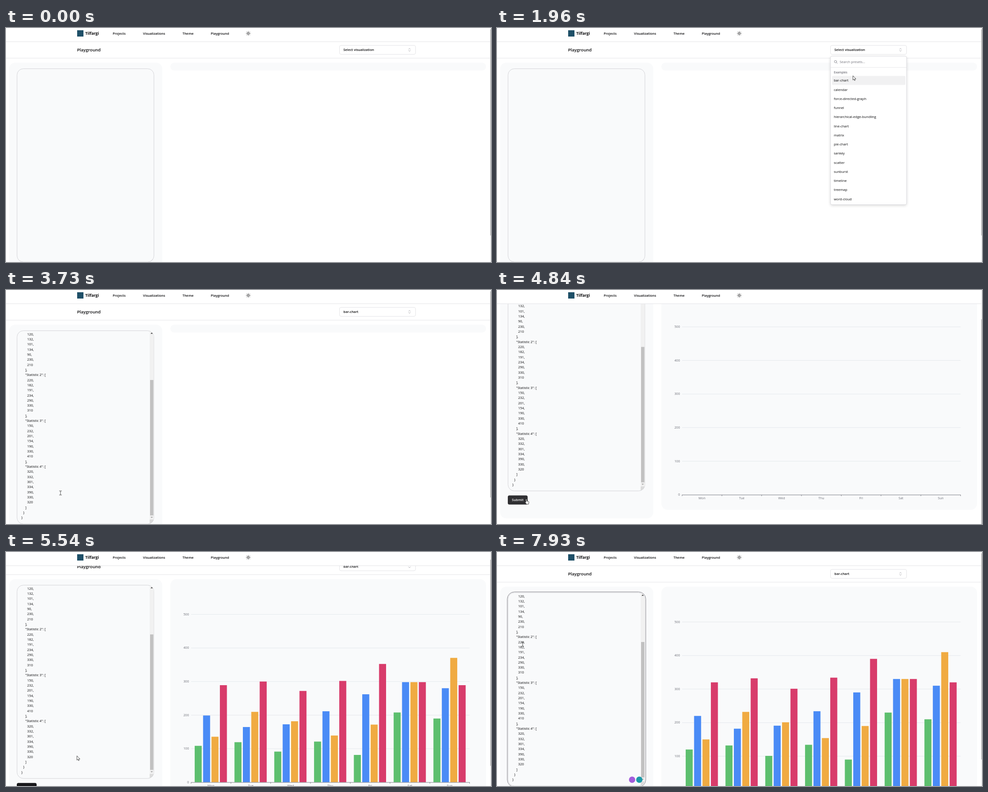
Recreate the animation shown at these times as an HTML page with a canvas. Size 1077 by 520 pixels, loop 8000 ms.

```html
<!DOCTYPE html>
<html lang="en">
<head>
<meta charset="utf-8">
<title>Chart playground</title>
<style>
  html, body { margin: 0; width: 100%; height: 100%; overflow: hidden; background: #fff; }
  canvas { display: block; }
</style>
</head>
<body>
<canvas id="stage" width="1077" height="520"></canvas>
<script>
const ctx = document.getElementById('stage').getContext('2d');
const LOOP = 8000, W = 1077, H = 520;
const INK = '#09090b', MUTED = '#71717a', LINE = '#e4e4e7', PANEL = '#f9fafb';

const DAYS = ['Mon', 'Tue', 'Wed', 'Thu', 'Fri', 'Sat', 'Sun'];
const SERIES = [
  ['#5dbf6e', [120, 132, 101, 134, 90, 230, 210]],
  ['#4a8bf6', [220, 182, 191, 234, 290, 330, 310]],
  ['#f0ab42', [150, 232, 201, 154, 190, 330, 410]],
  ['#d83c6b', [320, 332, 301, 334, 390, 330, 320]]
];
const PRESETS = ['bar-chart', 'calendar', 'force-directed-graph', 'funnel', 'hierarchical-edge-bundling',
  'line-chart', 'matrix', 'pie-chart', 'sankey', 'scatter', 'sunburst', 'timeline', 'treemap', 'word-cloud'];
const CODE = JSON.stringify({
  headers: DAYS,
  values: Object.fromEntries(SERIES.map(([, v], i) => ['Statistic ' + (i + 1), v]))
}, null, 2).split('\n');

// time, x, y of the mouse
const PATH = [
  [130, 1038, 499], [600, 839, 71], [930, 839, 71], [1000, 793, 69], [1140, 789, 46], [1480, 789, 46],
  [2110, 790, 116], [2550, 789, 119], [2760, 789, 119], [2920, 665, 215], [3230, 121, 451], [3800, 121, 451],
  [4220, 62, 462], [4430, 62, 462], [4500, 64, 465], [5000, 64, 465], [5400, 157, 453], [5650, 157, 453],
  [6300, 84, 159], [6780, 76, 193], [7600, 76, 193], [7740, 57, 205]
];
const CLICKS = [[1340, 1470], [2600, 2760], [4690, 4810], [7050, 7120]];

const ramp = (t, a, b) => Math.min(1, Math.max(0, (t - a) / (b - a)));
const smooth = (t, a, b) => { const p = ramp(t, a, b); return p * p * (3 - 2 * p); };
const within = (t, a, b) => t >= a && t < b;

function box(x, y, w, h, r, fill, stroke) {
  ctx.beginPath();
  ctx.roundRect(x, y, w, h, r);
  if (fill) { ctx.fillStyle = fill; ctx.fill(); }
  if (stroke) { ctx.strokeStyle = stroke; ctx.lineWidth = 1; ctx.stroke(); }
}

function rect(x, y, w, h, fill) {
  ctx.fillStyle = fill;
  ctx.fillRect(x, y, w, h);
}

function disc(x, y, r, fill) {
  ctx.beginPath();
  ctx.arc(x, y, r, 0, 7);
  ctx.fillStyle = fill;
  ctx.fill();
}

// y is the middle of the capitals
function text(s, x, y, size = 7.5, weight = 400, fill = INK, align = 'left') {
  ctx.font = `${weight} ${size}px "Open Sans", "Noto Sans", sans-serif`;
  ctx.textAlign = align;
  ctx.fillStyle = fill;
  ctx.fillText(s, x, y + size * 0.36);
}

function path(d, x, y, stroke, width = 0.9, fill) {
  const p = new Path2D(d);
  ctx.save();
  ctx.translate(x, y);
  if (fill) { ctx.fillStyle = fill; ctx.fill(p); }
  ctx.strokeStyle = stroke;
  ctx.lineWidth = width;
  ctx.lineJoin = ctx.lineCap = 'round';
  ctx.stroke(p);
  ctx.restore();
}

function triangle(x, y, dir, fill) {
  ctx.beginPath();
  ctx.moveTo(x - 2.6, y + 1.3 * dir);
  ctx.lineTo(x + 2.6, y + 1.3 * dir);
  ctx.lineTo(x, y - 1.5 * dir);
  ctx.fillStyle = fill;
  ctx.fill();
}

function navBar() {
  rect(0, 0, W, 30, '#fff');
  rect(0, 30, 1076, 1, LINE);
  rect(158, 5, 14, 14, '#1f5068');
  text('Tilfargi', 176, 12.3, 8.7, 700);
  [['Projects', 237], ['Visualizations', 304.3], ['Theme', 392], ['Playground', 454.8]]
    .forEach(([s, x]) => text(s, x, 12.2, 7.4, 600));
  ctx.beginPath();
  ctx.arc(538, 12, 2.1, 0, 7);
  for (let i = 0; i < 8; i++) {
    const c = Math.cos(i * Math.PI / 4), s = Math.sin(i * Math.PI / 4);
    ctx.moveTo(538 + 3.7 * c, 12 + 3.7 * s);
    ctx.lineTo(538 + 4.9 * c, 12 + 4.9 * s);
  }
  ctx.strokeStyle = INK;
  ctx.lineWidth = 1;
  ctx.stroke();
}

function titleBar(t) {
  text('Playground', 157.7, 49, 9.6, 600);
  rect(0, 66.5, 1076, 1, LINE);
  box(740.5, 38.5, 169, 20, 3.5, '#fff', LINE);
  text(t < 2610 ? 'Select visualization' : 'bar-chart', 749.3, 48.8, 7.4, 600);
  path('M-2-1.3L0-3.2L2-1.3M-2 1.3L0 3.2L2 1.3', 896, 48.6, '#8a8a90', 0.7);
}

function editor(t, scroll) {
  const filled = t >= 2610, focused = t >= 7060;
  box(7, 77, 340, 504, 14, PANEL);
  if (focused) {
    box(22.8, 88.6, 307.6, 433.4, 16, '#fff', '#85858c');
  }
  box(24.5, 90.5, 304, 429.5, 14, PANEL, '#d4d4d8');
  ctx.save();
  ctx.beginPath();
  ctx.roundRect(25, 91, 303.5, 428.5, 13.5);
  ctx.clip();
  if (filled) {
    CODE.forEach((line, i) => {
      const body = line.trimStart();
      text(body, 34 + (line.length - body.length) * 2.17, 105.2 + i * 11.33 - scroll, 7.45);
    });
    rect(319, 91, 10, 419, '#f1f1f1');
    rect(320, 100 + 100 * scroll / 143.3, 7.3, 301, '#c1c1c1');
    triangle(323.6, 96, 1, scroll > 0 ? '#404040' : '#a3a3a3');
    triangle(323.6, 505.3, -1, scroll < 143 ? '#404040' : '#a3a3a3');
    rect(319, 510, 10, 10, '#dcdcdc');
  }
  path('M0 6L6 0M3 6L6 3', 321.5, 513, '#77777c', 0.7);
  ctx.restore();
  const hover = within(t, 4250, 5080);
  box(24, 530, 44, 20.3, 3.5, hover ? '#2f2f32' : '#18181b');
  text('Submit', 46, 540, 7.5, 600, '#fafafa', 'center');
  if (t >= 7670) {
    disc(300, 506, 7, '#a25ddc');
    disc(316, 506, 7, '#1c9aa8');
  }
}

function chart(t) {
  const shown = t >= 4770;
  box(365, 77, 701, shown ? 485 : 17.5, shown ? 14 : 8.7, PANEL);
  if (!shown) return;
  const base = 528.4, unit = 0.746, left = 411, band = 88.36;
  for (let v = 0; v <= 500; v += 100) {
    const y = base - v * unit;
    if (v) rect(left, y - 0.4, 618.5, 0.9, '#e2e6ea');
    text(v, 406.3, y - 0.3, 7.2, 400, '#6e7079', 'right');
  }
  const grow = 1 - (1 - ramp(t, 4870, 6110)) ** 3;
  SERIES.forEach(([color, values], s) => values.forEach((v, i) => {
    const h = v * unit * grow;
    rect(left + 8 + i * band + s * 18.65, base - h, 15.6, h, color);
  }));
  rect(left, base, 618.5, 0.9, '#6e7079');
  for (let i = 0; i <= 7; i++) rect(left - 0.4 + i * band, base, 0.8, 3.2, '#6e7079');
  DAYS.forEach((d, i) => text(d, left + (i + 0.5) * band, base + 7.6, 7.2, 400, '#6e7079', 'center'));
}

function menu(t) {
  const alpha = ramp(t, 1360, 1490) * (1 - ramp(t, 2665, 2815));
  if (!alpha) return;
  ctx.save();
  ctx.globalAlpha = alpha;
  ctx.shadowColor = 'rgba(0,0,0,.16)';
  ctx.shadowBlur = 6;
  ctx.shadowOffsetY = 2;
  box(740.5, 62.5, 169, 330, 3.5, '#fff');
  ctx.shadowColor = 'transparent';
  box(740.5, 62.5, 169, 330, 3.5, null, '#dcdce0');
  path('M2.6 0A2.6 2.6 0 1 1 -2.6 0A2.6 2.6 0 1 1 2.6 0M1.9 1.9L4 4', 751.7, 74.7, MUTED, 0.8);
  text('Search presets...', 761, 75.6, 7.4, 400, MUTED);
  rect(741, 87.3, 168, 0.9, LINE);
  text('Examples', 748, 98.7, 6.5, 600, MUTED);
  box(744, 106.4, 163, 20, 2.5, '#f1f1f2');
  PRESETS.forEach((s, i) => text(s, 748, 116.6 + i * 20.25, 7.55));
  if (t >= 2610) path('M-2.5 0L-.8 1.8L2.6-2', 898, 116.3, INK);
  ctx.restore();
}

function mouse(t) {
  if (t < PATH[0][0]) return;
  let k = PATH.findIndex(p => p[0] > t);
  const b = PATH[k < 0 ? PATH.length - 1 : k];
  const a = k < 0 ? b : PATH[k - 1];
  const p = k < 0 ? 0 : smooth(t, a[0], b[0]);
  const x = a[1] + (b[1] - a[1]) * p, y = a[2] + (b[2] - a[2]) * p;
  if (CLICKS.some(([from, to]) => within(t, from, to))) disc(x, y, 6.5, 'rgba(248,236,60,.8)');
  const onButton = y < 59 || within(t, 4180, 5080);
  const onText = x < 319 && (t < 4180 || t > 5650);
  if (onButton) {
    path('M0 0Q1-1 2 0V4L6.2 5Q7 5.4 6.8 7L6 11H1.8L-1.5 7.3Q-1.6 5.8 0 6.6Z', x, y, '#222', 0.8, '#fff');
  } else if (onText) {
    const beam = 'M-2.4-4.5H-.7L0-4L.7-4.5H2.4M0-4V4M-2.4 4.5H-.7L0 4L.7 4.5H2.4';
    path(beam, x, y, '#222', 0.8);
  } else {
    path('M0 0V9.2L2.1 7.3L3.6 10.5L5 9.9L3.6 6.8H6.4Z', x + 0.5, y + 0.3, '#222', 0.8, '#fff');
  }
}

function draw(t) {
  const page = 56.7 * (smooth(t, 3840, 3980) - smooth(t, 5400, 5535))
    + 16.8 * (smooth(t, 3990, 4130) - smooth(t, 5620, 5760));
  const scroll = 56.7 * (smooth(t, 3260, 3400) + smooth(t, 3400, 3540)) + 29.9 * smooth(t, 3540, 3680);
  rect(0, 0, W, H, '#fff');
  ctx.save();
  ctx.translate(0, -page);
  titleBar(t);
  editor(t, scroll);
  chart(t);
  ctx.restore();
  navBar();
  rect(1075, 0, 2, H, '#f1f1f1');
  rect(1075.7, 3 + page * 0.844, 1.3, 458, '#a8a8a8');
  menu(t);
  mouse(t);
}

const start = performance.now();
function frame() {
  draw((performance.now() - start) % LOOP);
  requestAnimationFrame(frame);
}
frame();
</script>
</body>
</html>
```
